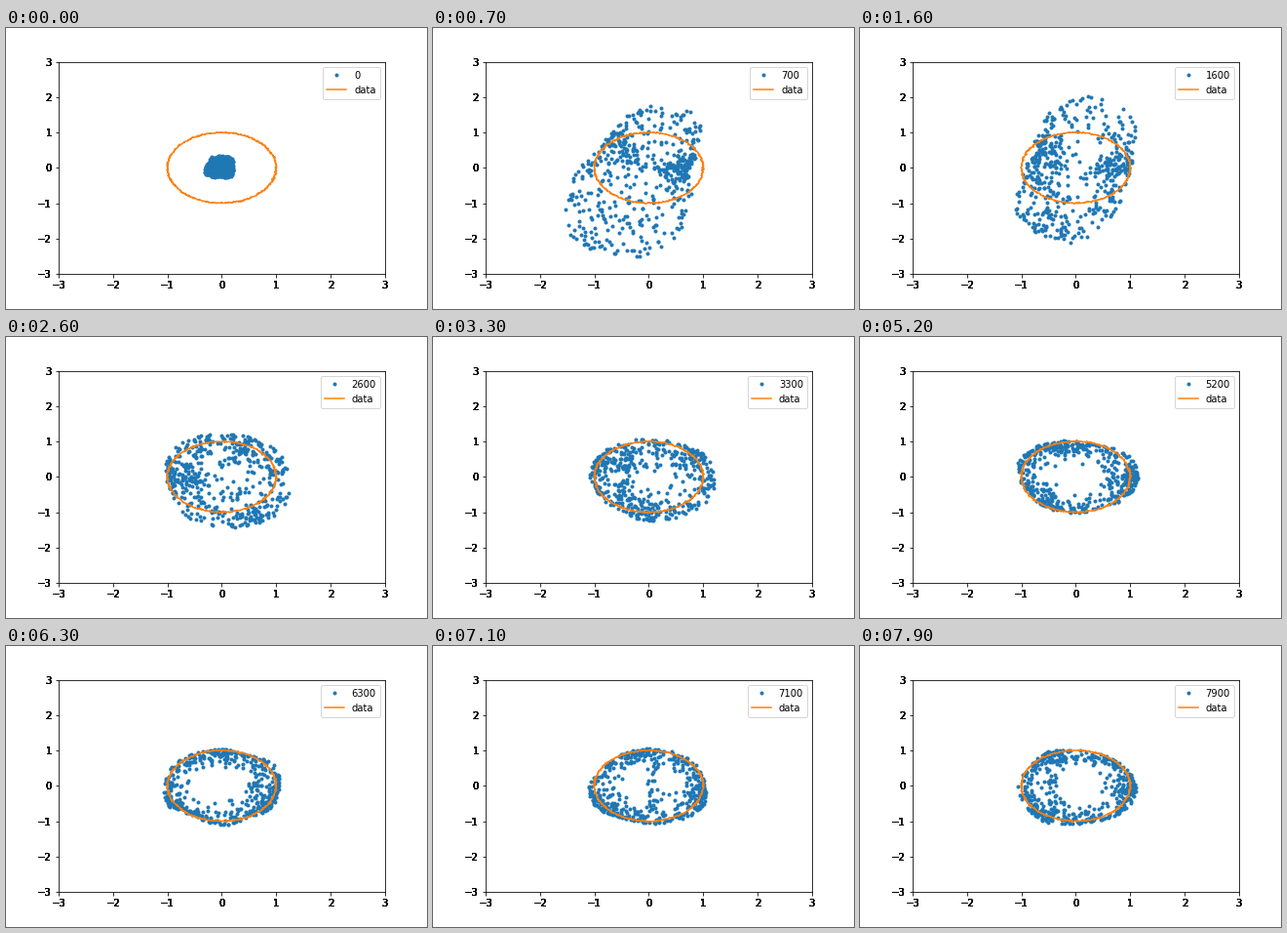
Animation of 432 by 288 pixels, one loop 8000 ms. Source, as a matplotlib script:

```python
import matplotlib.pyplot as plt
import numpy as np
from matplotlib.animation import FuncAnimation

plt.rcdefaults()

FRAMES, INTERVAL = 80, 100
COUNT = 500
LIMIT = 3
ANGLES = np.radians(np.arange(0, 360, 30))

# Cloud outline: step -> radius every 30 degrees.
OUTLINE = {
    0: [.20, .24, .36, .33, .36, .28, .30, .36, .30, .26, .30, .24],
    500: [.7, .9, 1.3, 1.2, .9, .9, 1.3, 1.9, 3.0, 2.9, 1.5, .8],
    1000: [.9, 1.3, 2.3, 2.7, 1.9, 1.3, 1.2, 1.4, 2.1, 2.1, 1.2, .8],
    1600: [1.0, 1.2, 1.95, 2.1, 1.3, .85, .92, 1.2, 1.95, 2.15, 1.4, 1.05],
    2600: [1.2, 1.25, 1.25, 1.2, 1.25, 1.15, 1.0, 1.05, 1.3, 1.42, 1.5, 1.4],
    3200: [1.2, 1.2, 1.1, 1.1, 1.1, 1.1, 1.12, 1.1, 1.1, 1.25, 1.3, 1.3],
    4100: [1.3, 1.17, 1.03, 1.06, 1.05, 1.02, .97, .96, 1.0, 1.06, 1.05, 1.3],
    5200: [1.15, 1.15, 1.0, 1.0, 1.1, 1.17, 1.05, .98, 1.02, 1.02, 1.0, 1.1],
    6300: [1.05, 1.15, 1.0, 1.04, 1.05, 1.08, 1.05, 1.14, 1.0, 1.12, 1.03, 1.1],
    7900: [1.1, 1.03, 1.0, 1.0, 1.1, 1.0, 1.08, 1.08, 1.17, 1.07, 1.1, 1.13],
}

# step -> (radial exponent, clump angle, streak share, streak x)
TRAITS = {
    0: (.5, 0, 0, -.4),
    1600: (.36, 10, 0, -.4),
    2600: (.3, 60, .02, -.4),
    4100: (.18, 0, .1, -.45),
    5200: (.16, -5, .04, .6),
    6300: (.15, -25, .06, .6),
    7900: (.16, -10, .07, -.45),
}


def blend(table, step):
    """Interpolate every column of a keyed table at the given step."""
    keys = list(table)
    return np.array([np.interp(step, keys, col) for col in zip(*table.values())])


def wobble(step, theta):
    """Outline ripple that vanishes at each key."""
    keys = list(OUTLINE)
    phase = np.interp(step, keys, range(len(keys))) % 1
    return .05 * np.sin(np.pi * phase) * np.sin(3 * theta + step / 170)


def cloud(step, rng):
    power, clump, share, streak_x = blend(TRAITS, step)
    u = rng.uniform(0, 2 * np.pi, COUNT)
    theta = u - .15 * np.sin(3 * (u - np.radians(clump)))
    edge = np.interp(theta, ANGLES, blend(OUTLINE, step), period=2 * np.pi)
    r = (edge + wobble(step, theta)) * rng.uniform(0, 1, COUNT) ** power
    x, y = r * np.cos(theta), r * np.sin(theta)
    n = int(share * COUNT)
    x[:n] = streak_x + .06 * rng.standard_normal(n)
    y[:n] = rng.uniform(-.75, .75, n)
    return x, y


def ring(rng):
    t = np.linspace(0, 2 * np.pi, COUNT)
    nx, ny = .01 * rng.standard_normal((2, COUNT))
    return np.cos(t) + nx, np.sin(t) + ny


def thicken_labels(ax, copies=8):
    """Overprint the tick labels so their edges turn solid."""
    pad = 7
    xt, xva, xha = ax.get_xaxis_text1_transform(pad)
    yt, yva, yha = ax.get_yaxis_text1_transform(pad)
    for v in range(-LIMIT, LIMIT + 1):
        text = str(v).replace("-", "\u2212")
        for _ in range(copies):
            ax.text(v, 0, text, transform=xt, va=xva, ha=xha)
            ax.text(0, v, text, transform=yt, va=yva, ha=yha)


fig = plt.figure(figsize=(6, 4), dpi=72)
ax = fig.add_axes([.125, .125, .775, .755])
ax.set(xlim=(-LIMIT, LIMIT), ylim=(-LIMIT, LIMIT))
ticks = range(-LIMIT, LIMIT + 1)
ax.set_xticks(ticks)
ax.set_yticks(ticks)
thicken_labels(ax)

dots, = ax.plot([], [], ".", label="0")
line, = ax.plot([], [], label="data")
legend = ax.legend(loc="upper right")


def update(i):
    rng = np.random.default_rng(i + 7)
    step = i * 100
    dots.set_data(*cloud(step, rng))
    line.set_data(*ring(rng))
    legend.get_texts()[0].set_text(str(step))
    return dots, line, legend


anim = FuncAnimation(fig, update, frames=FRAMES, interval=INTERVAL,
                     repeat=True, repeat_delay=0, blit=False)
plt.show()
```
